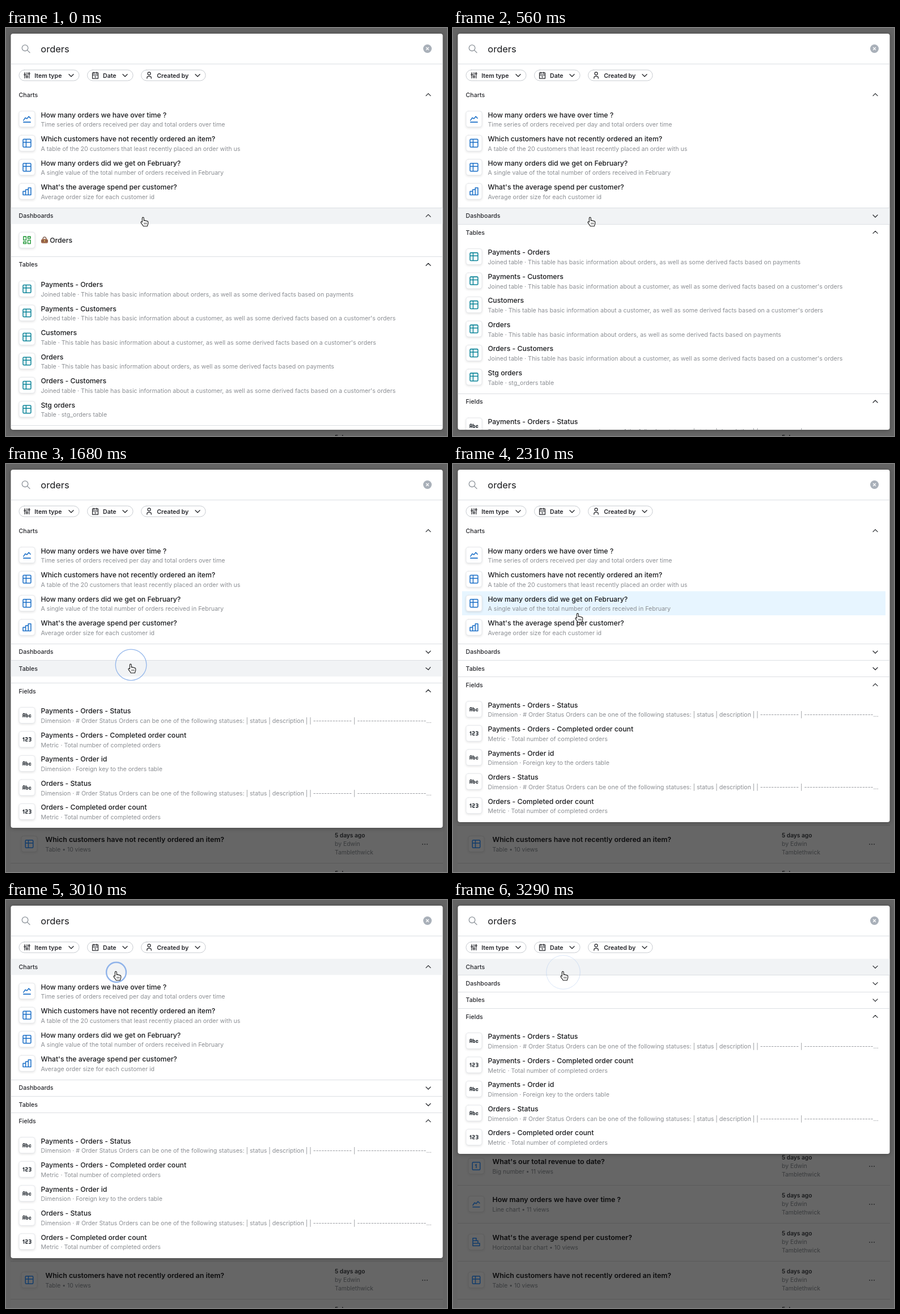
An HTML page with a canvas for the animation above (3360 ms loop, 778 by 720 pixels).

```html
<!DOCTYPE html>
<html lang="en">
<head>
<meta charset="utf-8">
<title>Search results</title>
<style>
html, body { margin: 0; width: 100%; height: 100%; overflow: hidden; background: #646464; }
canvas { display: block; width: 778px; height: 720px; }
</style>
</head>
<body>
<canvas id="stage"></canvas>
<script>
const W = 778, H = 720, LOOP = 3360, STEP = 70;
const canvas = document.getElementById('stage');
const ctx = canvas.getContext('2d');
const dpr = window.devicePixelRatio || 1;
canvas.width = W * dpr;
canvas.height = H * dpr;

const INK = '#1a1b1e', MUTED = '#8b8e93', LINE = '#dcdfe3';
const BLUE = '#1c70c8', GREEN = '#2f9e44', TEAL = '#0c8599';
const MODAL = { x: 8.5, y: 10, w: 762, maxBottom: 709 };
const HEAD = 29.25, ROW = 42.5, PAD = 14.3, FIRST = 103.7;

// Icons on a 24 unit grid
const ICON = {
  line: 'M4 19H20M4 15L8 9L12 11L16 6L20 10',
  table: 'M5 3H19a2 2 0 0 1 2 2V19a2 2 0 0 1-2 2H5a2 2 0 0 1-2-2V5a2 2 0 0 1 2-2zM3 10H21M10 3V21',
  bars: 'M3 12H9V20H3zM9 8H15V20H9zM15 4H21V20H15z',
  hbars: 'M4 3V9H12V3zM4 9V15H16V9zM4 15V21H20V15z',
  board: 'M4 4H10V12H4zM4 16H10V20H4zM14 12H20V20H14zM14 4H20V8H14z',
  one: 'M5 3H19a2 2 0 0 1 2 2V19a2 2 0 0 1-2 2H5a2 2 0 0 1-2-2V5a2 2 0 0 1 2-2zM10 10L12 8V16',
  abc: 'M3 16V10a2 2 0 1 1 4 0V16M3 13H7M10 8V14a2 2 0 1 0 4 0V13a2 2 0 1 0-4 0V14M20.7 12a2 2 0 0 0-3.7 1V14a2 2 0 0 0 3.7 1',
  num: 'M3 10L5 8V16M9 8H12a1 1 0 0 1 1 1V11a1 1 0 0 1-1 1H10a1 1 0 0 0-1 1V15a1 1 0 0 0 1 1H13M17 8H19.5a1.5 1.5 0 0 1 1.5 1.5V10.5a1.5 1.5 0 0 1-1.5 1.5H18H19.5a1.5 1.5 0 0 1 1.5 1.5V14.5a1.5 1.5 0 0 1-1.5 1.5H17',
  sliders: 'M4 10a2 2 0 1 0 4 0a2 2 0 1 0-4 0M6 4V8M6 12V20M10 16a2 2 0 1 0 4 0a2 2 0 1 0-4 0M12 4V14M12 18V20M16 7a2 2 0 1 0 4 0a2 2 0 1 0-4 0M18 4V5M18 9V20',
  calendar: 'M4 5H20V21H4zM16 3V7M8 3V7M4 11H20M11 15H12V18',
  user: 'M8 7a4 4 0 1 0 8 0a4 4 0 1 0-8 0M6 21V19a4 4 0 0 1 4-4H14a4 4 0 0 1 4 4V21'
};
for (const k in ICON) ICON[k] = new Path2D(ICON[k]);

const hand = new Path2D('M-2.2 7.2V.2C-2.2-1.9.7-1.9.7.2V4.6C1.2 3.5 3.2 3.7 3.4 5C4.1 4.1 5.8 4.5 6 5.7C6.7 5.1 8.2 5.6 8.2 7V9.6C8.2 11.4 7 12 6.8 14.2H-.4C-.7 12.2-3 10.6-4.4 8.2C-5.2 6.6-3.6 5.6-2.2 7.2z');

const facts = 'This table has basic information about ';
const orderFacts = facts + 'orders, as well as some derived facts based on payments';
const customerFacts = facts + "a customer, as well as some derived facts based on a customer's orders";
const statusText = 'Dimension · # Order Status Orders can be one of the following statuses: | status | description | | ' +
  '-'.repeat(14) + ' | ' + '-'.repeat(60);
const countText = 'Metric · Total number of completed orders';

const sections = [
  { name: 'Charts', color: BLUE, press: 2915, items: [
    ['line', 'How many orders we have over time ?', 'Time series of orders received per day and total orders over time'],
    ['table', 'Which customers have not recently ordered an item?', 'A table of the 20 customers that least recently placed an order with us'],
    ['table', 'How many orders did we get on February?', 'A single value of the total number of orders received in February'],
    ['bars', "What's the average spend per customer?", 'Average order size for each customer id']] },
  { name: 'Dashboards', color: GREEN, press: 55, items: [['board', 'Orders']] },
  { name: 'Tables', color: TEAL, press: 1435, items: [
    ['table', 'Payments - Orders', 'Joined table · ' + orderFacts],
    ['table', 'Payments - Customers', 'Joined table · ' + customerFacts],
    ['table', 'Customers', 'Table · ' + customerFacts],
    ['table', 'Orders', 'Table · ' + orderFacts],
    ['table', 'Orders - Customers', 'Joined table · ' + customerFacts],
    ['table', 'Stg orders', 'Table · stg_orders table']] },
  { name: 'Fields', color: '#343a40', press: Infinity, items: [
    ['abc', 'Payments - Orders - Status', statusText],
    ['num', 'Payments - Orders - Completed order count', countText],
    ['abc', 'Payments - Order id', 'Dimension · Foreign key to the orders table'],
    ['abc', 'Orders - Status', statusText],
    ['num', 'Orders - Completed order count', countText]] }
];

const pageRows = [
  ['one', "What's our total revenue to date?", 'Big number • 11 views'],
  ['line', 'How many orders we have over time ?', 'Line chart • 11 views'],
  ['hbars', "What's the average spend per customer?", 'Horizontal bar chart • 10 views'],
  ['table', 'Which customers have not recently ordered an item?', 'Table • 10 views'],
  ['bars', 'How many orders did we get on February?', 'Bar chart • 9 views']
];

const clamp = v => Math.max(0, Math.min(1, v));
const lerp = (a, b, u) => a + (b - a) * u;
const smooth = u => u * u * (3 - 2 * u);

// CSS "ease": cubic-bezier(.25, .1, .25, 1)
function ease(x) {
  if (x <= 0 || x >= 1) return clamp(x);
  const curve = (a, b, s) => 3 * a * s * (1 - s) ** 2 + 3 * b * s * s * (1 - s) + s ** 3;
  let lo = 0, hi = 1;
  for (let i = 0; i < 24; i++) {
    const mid = (lo + hi) / 2;
    if (curve(.25, .25, mid) < x) lo = mid; else hi = mid;
  }
  return curve(.1, 1, lo);
}

function text(str, x, mid, size, color, weight = 400) {
  ctx.font = `${weight} ${size}px Inter, "Open Sans", sans-serif`;
  ctx.fillStyle = color;
  ctx.fillText(str, x, mid + size * .36);
}

function fit(str, size, max) {
  ctx.font = `400 ${size}px Inter, "Open Sans", sans-serif`;
  if (ctx.measureText(str).width <= max) return str;
  while (ctx.measureText(str + '…').width > max) str = str.slice(0, -1);
  return str + '…';
}

function box(x, y, w, h, r) {
  ctx.beginPath();
  ctx.roundRect(x, y, w, h, r);
}

function rule(x, y, w, color) {
  ctx.fillStyle = color;
  ctx.fillRect(x, Math.round(y - .5), w, 1);
}

function icon(name, x, y, scale, color, width = 2) {
  ctx.save();
  ctx.translate(x - 12 * scale, y - 12 * scale);
  ctx.scale(scale, scale);
  ctx.lineWidth = width;
  ctx.lineCap = ctx.lineJoin = 'round';
  ctx.strokeStyle = color;
  ctx.stroke(ICON[name]);
  ctx.restore();
}

function chevron(x, y, turn, width) {
  ctx.save();
  ctx.translate(x, y);
  ctx.rotate(turn * Math.PI);
  ctx.beginPath();
  ctx.moveTo(-4, 2);
  ctx.lineTo(0, -2);
  ctx.lineTo(4, 2);
  ctx.lineWidth = width;
  ctx.lineCap = ctx.lineJoin = 'round';
  ctx.strokeStyle = '#2b2d31';
  ctx.stroke();
  ctx.restore();
}

function tile(x, y, fill, edge, shadow) {
  ctx.save();
  ctx.shadowColor = shadow;
  ctx.shadowBlur = 4 * dpr;
  ctx.shadowOffsetY = 1.5 * dpr;
  box(x - 14, y - 14, 28, 28, 4);
  ctx.fillStyle = fill;
  ctx.fill();
  ctx.restore();
  ctx.lineWidth = 1;
  ctx.strokeStyle = edge;
  ctx.stroke();
}

function handbag(x, y) {
  ctx.beginPath();
  ctx.ellipse(x, y - 1.5, 3, 4, 0, Math.PI, 0);
  ctx.lineWidth = 1.3;
  ctx.strokeStyle = '#6b4534';
  ctx.stroke();
  box(x - 6, y - 2, 12, 7.5, [3, 3, 2, 2]);
  ctx.fillStyle = '#a06a4e';
  ctx.fill();
  ctx.fillStyle = '#6f4635';
  ctx.fillRect(x - 6, y + 1, 12, 1);
  ctx.fillStyle = '#d9b45b';
  ctx.fillRect(x - 1, y, 2, 2.5);
}

function drawPage() {
  ctx.fillStyle = '#646464';
  ctx.fillRect(0, 0, W, H);
  ctx.fillStyle = '#666';
  ctx.fillRect(8, 11, 763, H);
  pageRows.forEach(([kind, title, sub], i) => {
    const y = 461.5 + 67 * i;
    rule(8, y + 42, 763, '#5a5a5a');
    tile(41, y + 8, '#676767', '#5e5e5e', 'rgba(0,0,0,.08)');
    icon(kind, 41, y + 8, .75, '#123c6b');
    text(title, 69.5, y, 12.4, '#0c0c0d', 600);
    text(sub, 69.5, y + 17.3, 10.4, '#393b3d');
    text('5 days ago', 580, y - 7, 10.2, '#18191b', 600);
    text('by Edwin', 580, y + 8, 10.4, '#393b3d');
    text('Tamblethwick', 580, y + 23, 10.4, '#393b3d');
    ctx.fillStyle = '#2a2b2d';
    for (const dx of [-4, 0, 4]) {
      ctx.beginPath();
      ctx.arc(739 + dx, y + 8.5, 1, 0, 7);
      ctx.fill();
    }
  });
}

function drawSearch() {
  ctx.lineWidth = 1.3;
  ctx.lineCap = 'round';
  ctx.strokeStyle = '#8f959c';
  ctx.beginPath();
  ctx.arc(33.6, 35.2, 5.3, 0, 7);
  ctx.moveTo(37.5, 39.1);
  ctx.lineTo(42, 43.5);
  ctx.stroke();
  text('orders', 61.3, 37.2, 16.5, INK);
  ctx.beginPath();
  ctx.arc(743.5, 36.5, 7.5, 0, 7);
  ctx.fillStyle = '#a9b0b9';
  ctx.fill();
  ctx.strokeStyle = '#fff';
  ctx.beginPath();
  for (const d of [-1, 1]) {
    ctx.moveTo(743.5 - 2, 36.5 - 2 * d);
    ctx.lineTo(743.5 + 2, 36.5 + 2 * d);
  }
  ctx.stroke();
  rule(MODAL.x, 63, MODAL.w, LINE);
}

function chip(kind, label, x, w, iconX, labelX) {
  box(x, 74, w, 19, 9.5);
  ctx.lineWidth = 1;
  ctx.strokeStyle = '#c8ccd1';
  ctx.stroke();
  icon(kind, iconX, 83.5, .62, '#25262b');
  text(label, labelX, 83.7, 10.6, '#25262b', 600);
  chevron(x + w - 14, 83.7, 1, 1.4);
}

function drawItem(section, [kind, title, sub], top, hot) {
  const mid = top + ROW / 2;
  if (hot) {
    ctx.fillStyle = '#e7f5ff';
    ctx.fillRect(16, top, 747, ROW);
  }
  tile(37, mid, '#fff', '#e6e8eb', 'rgba(0,0,0,.13)');
  icon(kind, 37, mid, .77, section.color);
  if (sub) {
    text(title, 61.4, mid - 7.6, 12.22, INK, 500);
    text(fit(sub, 10.6, 692.5), 61.5, mid + 9.8, 10.6, MUTED);
  } else {
    handbag(68, mid);
    text(title, 77.2, mid, 12.22, INK, 500);
  }
}

function drawSection(s, pointer) {
  const over = (top, h) => pointer.y >= top && pointer.y < top + h;
  if (over(s.top, HEAD)) {
    ctx.fillStyle = '#f1f3f5';
    ctx.fillRect(MODAL.x, s.top, MODAL.w, HEAD - .7);
  }
  if (s !== sections[0]) rule(MODAL.x, s.top, MODAL.w, LINE);
  text(s.name, 22.6, s.top + 14.3, 10.6, '#25262b', 500);
  chevron(745, s.top + 13.9 + .8 * s.shut, s.shut, 1.3);
  if (s.shut === 1) return;
  ctx.save();
  ctx.beginPath();
  ctx.rect(0, s.top + HEAD - .7, W, s.height - HEAD);
  ctx.clip();
  ctx.globalAlpha = 1 - s.shut;
  s.items.forEach((item, i) => {
    const top = s.top + HEAD + PAD / 2 - .6 + i * ROW;
    drawItem(s, item, top, over(top, ROW) && s.shut === 0);
  });
  ctx.restore();
}

function layout(t) {
  let top = FIRST;
  for (const s of sections) {
    s.shut = ease((t - s.press - 95) / 200);
    s.top = top;
    s.height = HEAD + (s.items.length * ROW + PAD) * (1 - s.shut);
    top += s.height;
  }
  return Math.min(MODAL.maxBottom, Math.round(top));
}

function pointerAt(t) {
  if (t < 1980) {
    const u = smooth(clamp((t - 680) / 520));
    return { x: lerp(242.5, 220.5, u), y: lerp(335.5, 354.5, u) };
  }
  const rise = clamp((t - 1980) / 330), glide = clamp((t - 2310) / 490);
  return {
    x: lerp(220.5, 194.5, smooth(glide)),
    y: lerp(354.5, 265, rise * rise) - 137.5 * (1 - (1 - glide) ** 2)
  };
}

function drawPointer(p, t) {
  for (const s of sections) {
    const age = t - s.press;
    if (age < 0 || age > 450) continue;
    ctx.globalAlpha = Math.min(1, (450 - age) / 220);
    ctx.beginPath();
    ctx.arc(p.x, p.y, 31 * (1 - Math.exp(-age / 115)), 0, 7);
    ctx.lineWidth = .7 + 3.2 * Math.exp(-age / 150);
    ctx.strokeStyle = '#8fb3ea';
    ctx.stroke();
    ctx.globalAlpha = 1;
  }
  ctx.save();
  ctx.translate(p.x, p.y);
  ctx.fillStyle = '#fff';
  ctx.fill(hand);
  ctx.lineWidth = 1.1;
  ctx.lineJoin = 'round';
  ctx.strokeStyle = '#1b1b1b';
  ctx.stroke(hand);
  ctx.beginPath();
  for (const x of [1.4, 3.4, 5.4]) {
    ctx.moveTo(x, 8);
    ctx.lineTo(x, 11);
  }
  ctx.lineWidth = .8;
  ctx.stroke();
  ctx.restore();
}

function draw(t) {
  const bottom = layout(t), pointer = pointerAt(t);
  ctx.setTransform(dpr, 0, 0, dpr, 0, 0);
  drawPage();
  ctx.save();
  ctx.shadowColor = 'rgba(0,0,0,.3)';
  ctx.shadowBlur = 7 * dpr;
  ctx.shadowOffsetY = dpr;
  box(MODAL.x, MODAL.y, MODAL.w, bottom - MODAL.y, 4);
  ctx.fillStyle = '#fff';
  ctx.fill();
  ctx.restore();
  ctx.save();
  ctx.clip();
  drawSearch();
  chip('sliders', 'Item type', 23, 106, 37, 50.2);
  chip('calendar', 'Date', 143.5, 80.5, 157.5, 171);
  chip('user', 'Created by', 238.5, 113.5, 252.5, 266.2);
  for (const s of sections) drawSection(s, pointer);
  ctx.restore();
  drawPointer(pointer, t);
}

const start = performance.now();
function tick() {
  const t = (performance.now() - start) % LOOP;
  draw(Math.floor(t / STEP) * STEP);
  requestAnimationFrame(tick);
}
tick();
</script>
</body>
</html>
```
